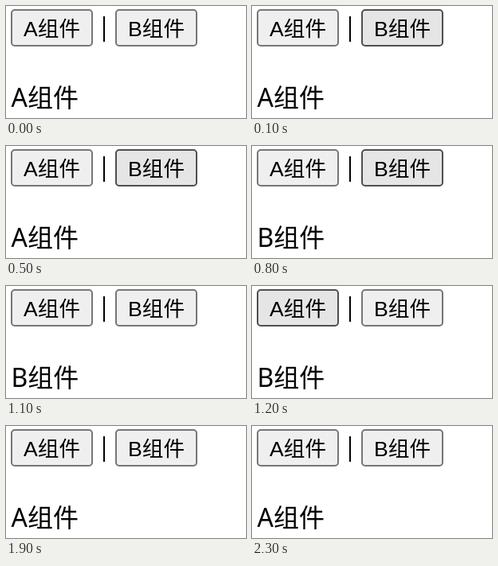
An HTML page with a canvas for the animation above (3100 ms loop, 301x141 px).

```html
<!DOCTYPE html>
<html lang="zh">
<head>
<meta charset="utf-8">
<style>
  html, body { margin: 0; width: 100%; height: 100%; overflow: hidden; background: #fff; }
  canvas { display: block; }
</style>
</head>
<body>
<canvas id="stage" width="301" height="141"></canvas>
<script>
const ctx = document.getElementById('stage').getContext('2d');
const LOOP = 3100;
const BUTTON_FONT = '26.67px "Liberation Sans", "Noto Sans CJK SC", "Noto Sans CJK", sans-serif';
const BODY_FONT = '32px "Noto Sans", "Noto Sans CJK SC", "Noto Sans CJK", sans-serif';

const STYLES = {
  normal: { fill: '#efefef', line: '#767676' },
  hover: { fill: '#e5e5e5', line: '#4f4f4f' },
  active: { fill: '#f5f5f5', line: '#8d8d8d' }
};

// Each entry: start time, value from then on
const STATES_A = [[0, 'normal'], [300, 'hover'], [500, 'normal'], [1200, 'hover'],
  [1700, 'active'], [1800, 'hover'], [1900, 'normal']];
const STATES_B = [[0, 'normal'], [100, 'hover'], [200, 'normal'], [500, 'hover'],
  [1100, 'normal'], [2200, 'hover'], [2300, 'normal']];
const VIEWS = [[0, 'A'], [800, 'B'], [1800, 'A']];

const valueAt = (track, t) => track.filter(([start]) => start <= t).pop()[1];

function label(text, x, y, font) {
  ctx.font = font;
  ctx.fillStyle = '#000';
  ctx.fillText(text, x, y);
}

function button(name, x, state) {
  const { fill, line } = STYLES[state];
  ctx.beginPath();
  ctx.roundRect(x + 1, 5, 101, 45, 4);
  ctx.fillStyle = fill;
  ctx.fill();
  ctx.strokeStyle = line;
  ctx.lineWidth = 2;
  ctx.stroke();
  label(name + '组件', x + 16, 38, BUTTON_FONT);
}

function draw(t) {
  ctx.fillStyle = '#fff';
  ctx.fillRect(0, 0, 301, 141);
  button('A', 6, valueAt(STATES_A, t));
  button('B', 137, valueAt(STATES_B, t));
  ctx.fillStyle = '#000';
  ctx.fillRect(122, 13, 2, 32);
  label(valueAt(VIEWS, t) + '组件', 6.5, 127, BODY_FONT);
}

const begin = performance.now();
function tick() {
  draw((performance.now() - begin) % LOOP);
  requestAnimationFrame(tick);
}
tick();
</script>
</body>
</html>
```
